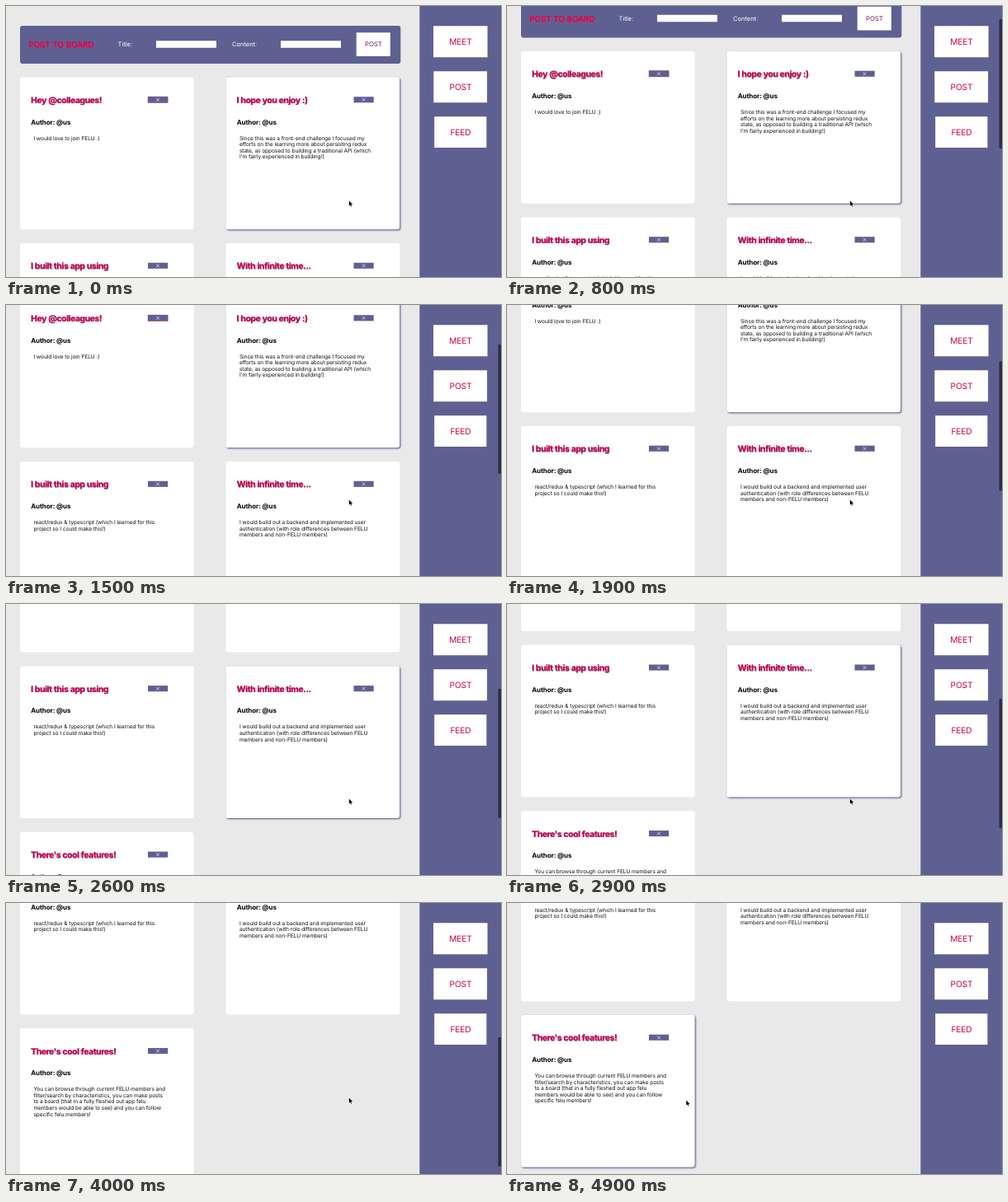
An HTML page with a canvas that plays this animation: 600 px wide and 329 px high, repeating every 5 s.

```html
<!DOCTYPE html>
<html lang="en">
<head>
<meta charset="utf-8">
<title>Message board</title>
<style>
html, body { margin: 0; width: 100%; height: 100%; overflow: hidden; background: #e9e9e9; }
canvas { display: block; width: 600px; height: 329px; }
</style>
</head>
<body>
<canvas id="stage"></canvas>
<script>
const W = 600, H = 329, LOOP = 5000, STEP = 100;
const PAGE_H = 684;
const PURPLE = '#5f6092', CRIMSON = '#c9004f';
const FONT = 'Inter, "Open Sans", sans-serif';

const canvas = document.getElementById('stage');
const ctx = canvas.getContext('2d');
const ratio = window.devicePixelRatio || 1;
canvas.width = W * ratio;
canvas.height = H * ratio;

const cards = [
  { title: 'Hey @colleagues!', body: ['I would love to join FELU :)'], active: true },
  { title: 'I hope you enjoy :)', body: [
    'Since this was a front-end challenge I focused my',
    'efforts on the learning more about persisting redux',
    'state, as opposed to building a traditional API (which',
    "I'm fairly experienced in building!)"] },
  { title: 'I built this app using', body: [
    'react/redux & typescript (which I learned for this',
    'project so I could make this!)'] },
  { title: 'With infinite time...', body: [
    'I would build out a backend and implemented user',
    'authentication (with role differences between FELU',
    'members and non-FELU members)'] },
  { title: "There's cool features!", body: [
    'You can browse through current FELU members and',
    'filter/search by characteristics, you can make posts',
    'to a board (that in a fully fleshed out app felu',
    'members would be able to see) and you can follow',
    'specific felu members!'] }
];

// [time, scroll offset]
const scrollKeys = [[0, 0], [100, 1], [600, 22], [800, 31.5], [1200, 67], [1900, 141],
  [2600, 212.6], [3400, 278.5], [4200, 349], [4400, 353.5], [5000, 353.5]];

// card index: [hover start, hover end]
const hovers = { 1: [-1000, 2200], 3: [2200, 3000], 4: [4550, 9000] };

const clamp = v => Math.max(0, Math.min(1, v));
const ramp = (t, from, to) => clamp((t - from) / (to - from));

// Monotone cubic interpolation through the keys
function curve(keys, t) {
  const slope = i => (keys[i + 1][1] - keys[i][1]) / (keys[i + 1][0] - keys[i][0]);
  const tangent = i => {
    if (i === 0 || i === keys.length - 1) return 0;
    const a = slope(i - 1), b = slope(i);
    return a * b > 0 ? 2 * a * b / (a + b) : 0;
  };
  let i = 0;
  while (i < keys.length - 2 && t > keys[i + 1][0]) i++;
  const [t0, y0] = keys[i], [t1, y1] = keys[i + 1];
  const d = t1 - t0, u = (t - t0) / d, v = 1 - u;
  return v * v * (1 + 2 * u) * y0 + u * u * (3 - 2 * u) * y1 +
    d * u * v * (v * tangent(i) - u * tangent(i + 1));
}

function box(x, y, w, h, color, r = 0) {
  ctx.fillStyle = color;
  ctx.beginPath();
  ctx.roundRect(x, y, w, h, r);
  ctx.fill();
}

function text(str, x, y, size, color, { weight = 400, spacing = 0, words = 0, align = 'left' } = {}) {
  ctx.font = `${weight} ${size}px ${FONT}`;
  ctx.letterSpacing = spacing + 'px';
  ctx.wordSpacing = words + 'px';
  ctx.textAlign = align;
  ctx.fillStyle = color;
  ctx.fillText(str, x, y);
}

function drawHeader() {
  box(17, 24, 461.3, 46, PURPLE, 3);
  text('POST TO BOARD', 28, 51, 9.8, '#ff1048');
  text('POST TO BOARD', 27.2, 50.2, 9.8, '#d4004c');
  text('Title:', 135.6, 49, 7.5, '#fff');
  box(182, 42.3, 73, 8.5, '#fff');
  text('Content:', 274, 49, 7.5, '#fff');
  box(333, 42.3, 73, 8.5, '#fff');
  box(424.7, 32.2, 41.1, 28.8, '#fff');
  text('POST', 445.4, 49, 7.8, '#7c1763', { align: 'center' });
}

function drawCard(card, i, hover) {
  const x = i % 2 ? 266.5 : 17;
  const y = 86.5 + Math.floor(i / 2) * 201.5;
  ctx.save();
  if (hover > 0) {
    ctx.shadowColor = `rgba(72, 73, 135, ${hover})`;
    ctx.shadowOffsetX = ctx.shadowOffsetY = ratio;
    ctx.shadowBlur = 2 * ratio;
  }
  box(x, y, 210.7, 184.7, '#fff', 3);
  ctx.restore();

  const bold = { weight: 800, spacing: -0.5, words: 0.5 };
  text(card.title, x + 13.5, y + 31.8, 10.4, 'rgba(95, 96, 146, .6)', bold);
  text(card.title, x + 13.1, y + 31.4, 10.4, CRIMSON, bold);

  if (card.active) box(x + 154.8, y + 23.3, 24.6, 7.9, '#d04058');
  box(x + 155, y + 23.7, 24.2, 7.1, PURPLE);
  ctx.strokeStyle = '#fff';
  ctx.lineWidth = 0.65;
  ctx.beginPath();
  const cx = x + 167, cy = y + 27.3, r = 1.9;
  ctx.moveTo(cx - r, cy - r);
  ctx.lineTo(cx + r, cy + r);
  ctx.moveTo(cx + r, cy - r);
  ctx.lineTo(cx - r, cy + r);
  ctx.stroke();

  text('Author: @us', x + 13.2, y + 57, 8, '#000', { weight: 700, spacing: -0.1 });
  card.body.forEach((line, n) =>
    text(line, x + 16.4, y + 76 + n * 7.55, 6.6, '#111', { spacing: -0.08 }));
}

function drawSidebar() {
  box(501.3, 0, W - 501.3, H, PURPLE);
  [['MEET', 518, 24.2, 65.6, 38], ['POST', 518.3, 79.2, 64.8, 38], ['FEED', 519.2, 134.2, 63.2, 37.8]]
    .forEach(([label, x, y, w, h]) => {
      box(x, y, w, h, '#fff');
      text(label, 551, y + 22.9, 10.2, CRIMSON, { align: 'center', spacing: -0.1 });
    });
}

function drawScrollbar(t, scroll) {
  ctx.globalAlpha = ramp(t, 0, 200) * (1 - ramp(t, 4550, 4800));
  box(596.6, scroll * H / PAGE_H + 0.5, 3.4, H * H / PAGE_H - 1, '#2c2c45', 1.5);
  ctx.globalAlpha = 1;
}

function drawCursor(t) {
  const u = ramp(t, 4300, 4900), e = u * u * (3 - 2 * u);
  ctx.save();
  ctx.translate(415.8 - 198.5 * e, 236.4 + 3 * e);
  ctx.beginPath();
  [[0, 0], [0, 6.2], [1.4, 5], [2.4, 7.2], [3.3, 6.8], [2.4, 4.6], [4.3, 4.5]]
    .forEach(p => ctx.lineTo(...p));
  ctx.closePath();
  ctx.strokeStyle = '#fff';
  ctx.lineWidth = 0.9;
  ctx.stroke();
  ctx.fillStyle = '#000';
  ctx.fill();
  ctx.restore();
}

function draw(t) {
  const scroll = curve(scrollKeys, t);
  ctx.setTransform(ratio, 0, 0, ratio, 0, 0);
  ctx.textRendering = 'geometricPrecision';
  box(0, 0, W, H, '#e9e9e9');
  ctx.save();
  ctx.translate(0, -scroll);
  drawHeader();
  cards.forEach((card, i) => {
    const [on, off] = hovers[i] || [9000, 9000];
    drawCard(card, i, ramp(t, on, on + 300) * (1 - ramp(t, off, off + 300)));
  });
  ctx.restore();
  drawSidebar();
  drawScrollbar(t, scroll);
  drawCursor(t);
}

const start = performance.now();
function tick() {
  const t = (performance.now() - start) % LOOP;
  draw(Math.floor((t + 4) / STEP) * STEP % LOOP);
  requestAnimationFrame(tick);
}
tick();
</script>
</body>
</html>
```
